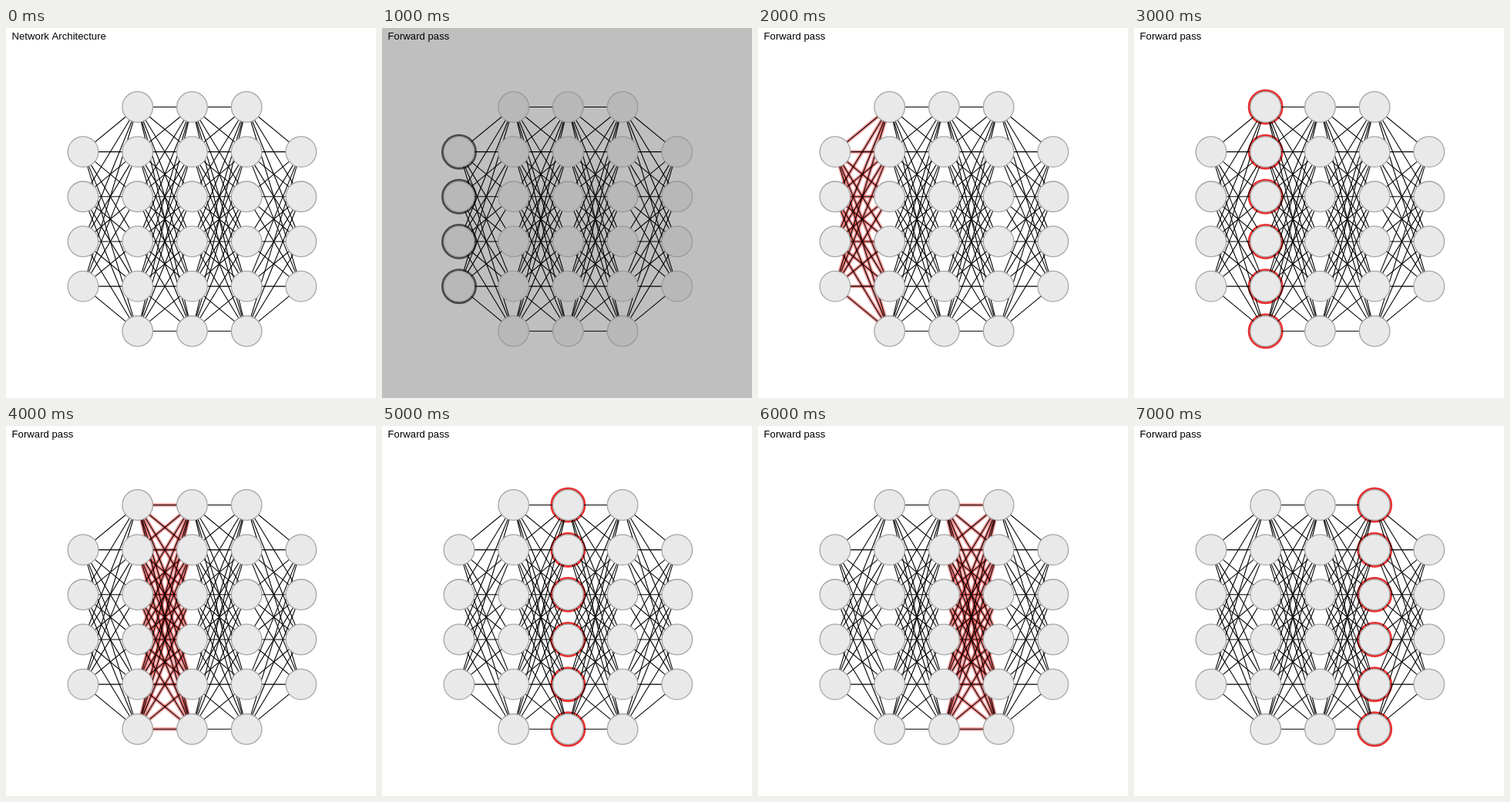
Write an HTML page with a canvas that moves like this. It is 480x480 px and loops after 8000 ms.

```html
<!DOCTYPE html>
<html lang="en">
<head>
<meta charset="utf-8">
<title>Network forward pass</title>
<style>
  html, body { margin: 0; width: 100%; height: 100%; overflow: hidden; }
  canvas { display: block; }
</style>
</head>
<body>
<canvas id="stage" width="480" height="480"></canvas>
<script>
const ctx = document.getElementById('stage').getContext('2d');
const STEP = 1000, STEPS = 8, TAU = 2 * Math.PI;
const light = { bg: '#fff', fill: '#e9e9e9', border: '#a6a6a6', ring: '#e93030' };
const dim = { bg: '#bfbfbf', fill: '#b8b8b8', border: '#999', ring: '#484848' };

const layers = [4, 6, 6, 6, 4].map((count, col) =>
  Array.from({ length: count }, (_, row) => ({
    x: 100 + 70.7 * col,
    y: 247.9 + 58.16 * (row - (count - 1) / 2)
  })));

const gaps = layers.slice(1).map((right, i) =>
  layers[i].flatMap(a => right.map(b => [a, b])));

function strokeEdges(edges, color, width) {
  ctx.strokeStyle = color;
  ctx.lineWidth = width;
  for (const [a, b] of edges) {
    ctx.beginPath();
    ctx.moveTo(a.x, a.y);
    ctx.lineTo(b.x, b.y);
    ctx.stroke();
  }
}

function strokeCircle({ x, y }, radius, color, width, fill) {
  ctx.beginPath();
  ctx.arc(x, y, radius, 0, TAU);
  if (fill) {
    ctx.fillStyle = fill;
    ctx.fill();
  }
  ctx.strokeStyle = color;
  ctx.lineWidth = width;
  ctx.stroke();
}

function draw(step) {
  const theme = step === 1 ? dim : light;
  ctx.fillStyle = theme.bg;
  ctx.fillRect(0, 0, 480, 480);

  // Odd steps light up a layer, even ones the edges leaving it.
  if (step % 2) {
    for (const node of layers[(step - 1) / 2]) strokeCircle(node, 21.3, theme.ring, 3.4);
  } else if (step) {
    strokeEdges(gaps[step / 2 - 1], 'rgba(233, 48, 48, 0.5)', 4.4);
  }

  strokeEdges(gaps.flat(), '#000', 1.1);
  for (const node of layers.flat()) strokeCircle(node, 19.8, theme.border, 1.3, theme.fill);

  ctx.fillStyle = '#000';
  ctx.font = '13.2px "Liberation Sans", Arial, sans-serif';
  ctx.fillText(step ? 'Forward pass' : 'Network Architecture', 7.5, 15);
}

const start = performance.now();
function tick() {
  draw(Math.floor((performance.now() - start) / STEP) % STEPS);
  requestAnimationFrame(tick);
}
tick();
</script>
</body>
</html>
```
